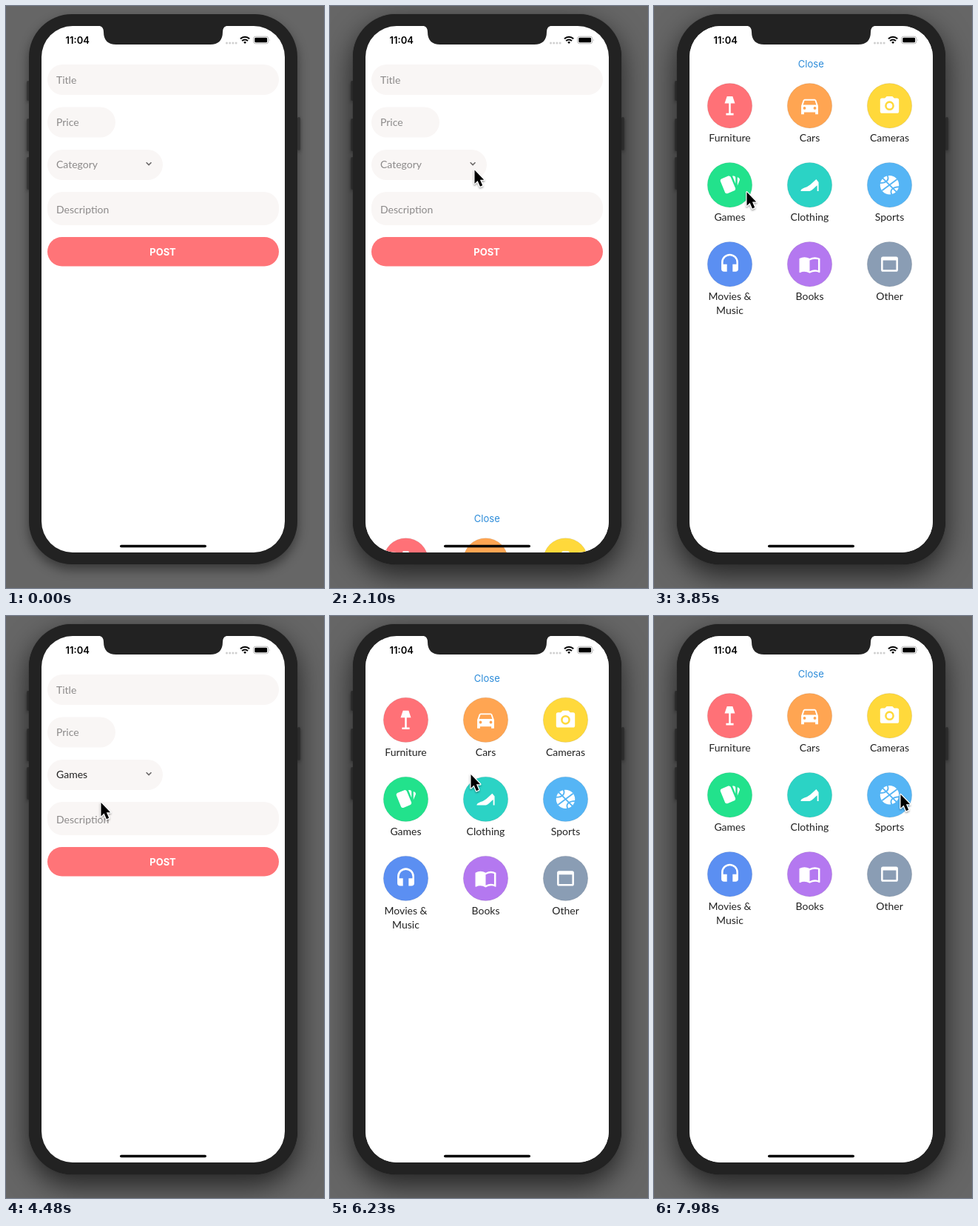
Write an HTML page that moves like this. It is 430 px wide and 786 px high and loops after 8000 ms.

```html
<!DOCTYPE html>
<html lang="en">
<head>
<meta charset="utf-8">
<title>Category picker</title>
<style>
  html, body { margin: 0; width: 100%; height: 100%; overflow: hidden; background: #666; }
  #stage { position: relative; width: 430px; height: 786px; overflow: hidden; }
  #stage div { position: absolute; }
  #phone {
    left: 31px; top: 11px; width: 363px; height: 743px;
    border-radius: 58px; background: #222;
    box-shadow: 0 7px 15px rgba(0, 0, 0, .45);
  }
  #phone.active { box-shadow: 0 14px 38px rgba(0, 0, 0, .68), 0 0 1px #222; }
  .key { width: 4px; border-radius: 2px; background: #414141; box-shadow: 0 2px 4px rgba(0, 0, 0, .35); }
  svg { position: absolute; left: 0; top: 0; }
  text { font: 14px Lato, sans-serif; fill: #222; }
  .hint { fill: #8c8a8a; }
  .system { font-family: Inter, sans-serif; font-size: 13px; }
  .mid { text-anchor: middle; }
  .field { fill: #f9f6f5; }
  .icon { fill: #fff; fill-rule: evenodd; }
</style>
</head>
<body>
<div id="stage">
  <div class="key" style="left:28px;top:101px;height:27px"></div>
  <div class="key" style="left:28px;top:152px;height:44px"></div>
  <div class="key" style="left:28px;top:204px;height:44px"></div>
  <div class="key" style="left:394px;top:150px;height:45px"></div>
  <div id="phone"></div>
  <svg width="430" height="786" viewBox="0 0 430 786">
    <defs>
      <clipPath id="screen"><rect x="48" y="27" width="329" height="711" rx="42"/></clipPath>
      <filter id="soft" x="-50%" y="-50%" width="200%" height="200%">
        <feDropShadow dx="0" dy="1.5" stdDeviation="1.3" flood-opacity=".4"/>
      </filter>
    </defs>
    <g clip-path="url(#screen)">
      <rect x="48" y="27" width="329" height="711" fill="#fff"/>
      <g class="field">
        <rect x="56" y="79" width="313" height="41" rx="20.5"/>
        <rect x="56" y="136.5" width="92" height="41" rx="20.5"/>
        <rect x="56" y="194" width="156" height="41" rx="20.5"/>
        <rect x="56" y="251" width="313" height="45" rx="20.5"/>
      </g>
      <text class="hint" x="68" y="105">Title</text>
      <text class="hint" x="68" y="162">Price</text>
      <text id="category" x="68" y="219"></text>
      <text class="hint" x="68" y="280">Description</text>
      <path d="M189.7 211.2l3.4 3.4 3.4-3.4" fill="none" stroke="#6d6a6a" stroke-width="1.6"/>
      <rect x="56" y="312" width="313" height="39.5" rx="19.7" fill="#ff7478"/>
      <text class="system mid" x="212" y="336.5" style="fill:#fff;font-weight:700">POST</text>

      <g id="modal">
        <rect x="48" y="27" width="329" height="711" fill="#fff"/>
        <text class="system mid" x="212.3" y="83" style="fill:#2b8bd9">Close</text>
      </g>

      <path d="M124 26.5H301Q293 27 293 35Q293 52 276 52H149Q132 52 132 35Q132 27 124 26.5Z" fill="#222"/>
      <text class="system" x="80.5" y="51" style="fill:#000;font-weight:600">11:04</text>
      <path d="M298.5 50h13" stroke="#cfcfcf" stroke-width="3" stroke-linecap="round" stroke-dasharray="0 4.2"/>
      <g fill="none" stroke="#000" stroke-width="2">
        <path d="M317 44.3a8.6 8.6 0 0 1 12.2 0M319.2 47.1a5.4 5.4 0 0 1 7.8 0"/>
        <path d="M321.2 48.9a2.7 2.7 0 0 1 3.8 0L323.1 51Z" fill="#000" stroke="none"/>
      </g>
      <rect x="334.7" y="41.2" width="20" height="9.6" rx="2.8" fill="none" stroke="#b5b5b5"/>
      <rect x="336.3" y="42.7" width="16.8" height="6.6" rx="1.4"/>
      <path d="M356 44.5q1.6 1.5 0 3Z" fill="#b5b5b5"/>
      <rect x="154" y="727.7" width="117" height="3.6" rx="1.8"/>
    </g>
    <g id="cursor" filter="url(#soft)">
      <path d="M1.5 3V21.4L5.6 17.5 9 25.2 12.2 23.8 8.9 16.2H14.2Z"
            stroke="#fff" stroke-width="2.4" stroke-linejoin="round" paint-order="stroke"/>
    </g>
  </svg>
</div>
<script>
const $ = id => document.getElementById(id);
const LOOP = 8000, STEP = 70, HEIGHT = 711;

const disc = (x, y, r) => `M${x - r} ${y}a${r} ${r} 0 1 0 ${2 * r} 0a${r} ${r} 0 1 0 ${-2 * r} 0Z`;

// Icons live on a 24 unit grid.
const categories = [
  ['Furniture', '#ff7177', 'M9 2H15L17.5 9.5H13V20H16V22H8V20H11V9.5H6.5Z'],
  ['Cars', '#ffa552', 'M6.5 5H17.5L18.9 6 21 12V21H18V19H6V21H3V12L5.1 6ZM5 11H19L17.5 6.5H6.5Z'
    + disc(6.5, 14.5, 1.5) + disc(17.5, 14.5, 1.5)],
  ['Cameras', '#ffd93b', 'M4 4H7L9 2H15L17 4H20Q22 4 22 6V18Q22 20 20 20H4Q2 20 2 18V6Q2 4 4 4Z'
    + disc(12, 12, 5) + disc(12, 12, 3)],
  ['Games', '#22e28c', 'M3 5.5L10.4 2.4Q12.2 2 13 3.5L18 15.5Q18.3 17.3 16.9 18L9.5 21.1Q7.6 21.5 6.9 20L2 8Q1.6 6.3 3 5.5ZM14.7 2.3H16Q18.1 2.3 18.1 4.3V10.6ZM20.1 3.8L21.5 4.4Q23 5.4 22.5 7L20.1 12.8Z'],
  ['Clothing', '#2bd3c5', 'M19 6L21.5 9V18.5H20V12.5C16.5 15 15 18 12 18.5H2.5C2.5 15.5 8 15 10 13.5C13.5 11.5 16 8.5 19 6Z'],
  ['Sports', '#55b5f5', disc(12, 12, 10),
    'M4.6 4.6L19.4 19.4M20 6L4 18M9.5 1.5C12 6 9.5 10 1.5 10M22.5 14C14.5 14 12 18 14.5 22.5'],
  ['Movies &|Music', '#5b8ff2', 'M12 1C7 1 3 5 3 10V17A3 3 0 0 0 6 20H9V12H5V10A7 7 0 0 1 19 10V12H15V20H18A3 3 0 0 0 21 17V10C21 5 17 1 12 1Z'],
  ['Books', '#b478f0', 'M12 21.5Q6.500 18.500 1.700 21Q1 21 1 20.500V6Q6.500 3 12 6Q17.500 3 23 6V20.500Q23 21 22.300 21Q17.500 18.500 12 21.500ZM12 8V19.500Q16.500 17 21 18.500V7Q16.500 5.500 12 8Z'],
  ['Other', '#8a9db4', 'M5 4H19Q21 4 21 6V18Q21 20 19 20H5Q3 20 3 18V6Q3 4 5 4ZM5 8V18H19V8Z']
];

$('modal').innerHTML += categories.map(([label, color, icon, seams], i) => {
  const x = 102.5 + i % 3 * 108, y = 134.7 + Math.floor(i / 3) * 107;
  const lines = label.replace('&', '&amp;').split('|').map((line, n) =>
    `<text class="mid" x="${x}" y="${y + 48.5 + n * 19}">${line}</text>`).join('');
  return `<circle cx="${x}" cy="${y}" r="30.2" fill="${color}" stroke="#000" stroke-opacity=".1" stroke-width=".8"/>
    <g transform="translate(${x} ${y}) scale(1.27) translate(-12 -12)">
      <path class="icon" d="${icon}"/>
      ${seams ? `<path d="${seams}" fill="none" stroke="${color}" stroke-width="1.5"/>` : ''}
    </g>${lines}`;
}).join('');

// time, x, y
const pointer = [
  [70, 364, 704], [560, 195, 214], [700, 190, 210], [770, 190, 210],
  [1050, 189, 236], [1120, 189, 236], [1260, 188, 234], [1330, 188, 234],
  [1610, 194, 218.5], [2870, 194, 218.5], [3360, 124, 248.3], [4410, 124, 248.3],
  [4480, 127, 249], [4620, 185, 211], [4970, 185, 211], [5250, 189, 211],
  [6720, 189, 211], [7560, 335, 236], [7770, 343, 238], [7980, 332, 238]
];

function pointerAt(t) {
  const next = pointer.findIndex(p => p[0] > t);
  if (next < 0) return pointer[pointer.length - 1].slice(1);
  const [t0, x0, y0] = pointer[next - 1], [t1, x1, y1] = pointer[next];
  const u = (t - t0) / (t1 - t0), k = u * u * (3 - 2 * u);
  return [x0 + (x1 - x0) * k, y0 + (y1 - y0) * k];
}

// Critically damped spring, from 1 down to 0.
function settle(ms) {
  const u = Math.max(0, ms) * 0.01837;
  return (1 + u) * Math.exp(-u);
}

function modalOffset(t) {
  if (t < 3860) return HEIGHT * settle(t - 2065);
  if (t < 5800) return HEIGHT * (1 - settle(t - 3860));
  return HEIGHT * settle(t - 5854);
}

function draw(now) {
  const t = Math.floor(now % LOOP / STEP) * STEP;
  const picked = t >= 3860;
  $('phone').className = t >= 1890 ? 'active' : '';
  $('category').textContent = picked ? 'Games' : 'Category';
  $('category').setAttribute('class', picked ? '' : 'hint');
  $('modal').setAttribute('transform', `translate(0 ${modalOffset(t).toFixed(2)})`);
  $('cursor').style.display = t < 70 ? 'none' : '';
  if (t >= 70) $('cursor').setAttribute('transform', `translate(${pointerAt(t)})`);
}

const start = performance.now();
function tick() {
  draw(performance.now() - start);
  requestAnimationFrame(tick);
}
tick();
</script>
</body>
</html>
```
